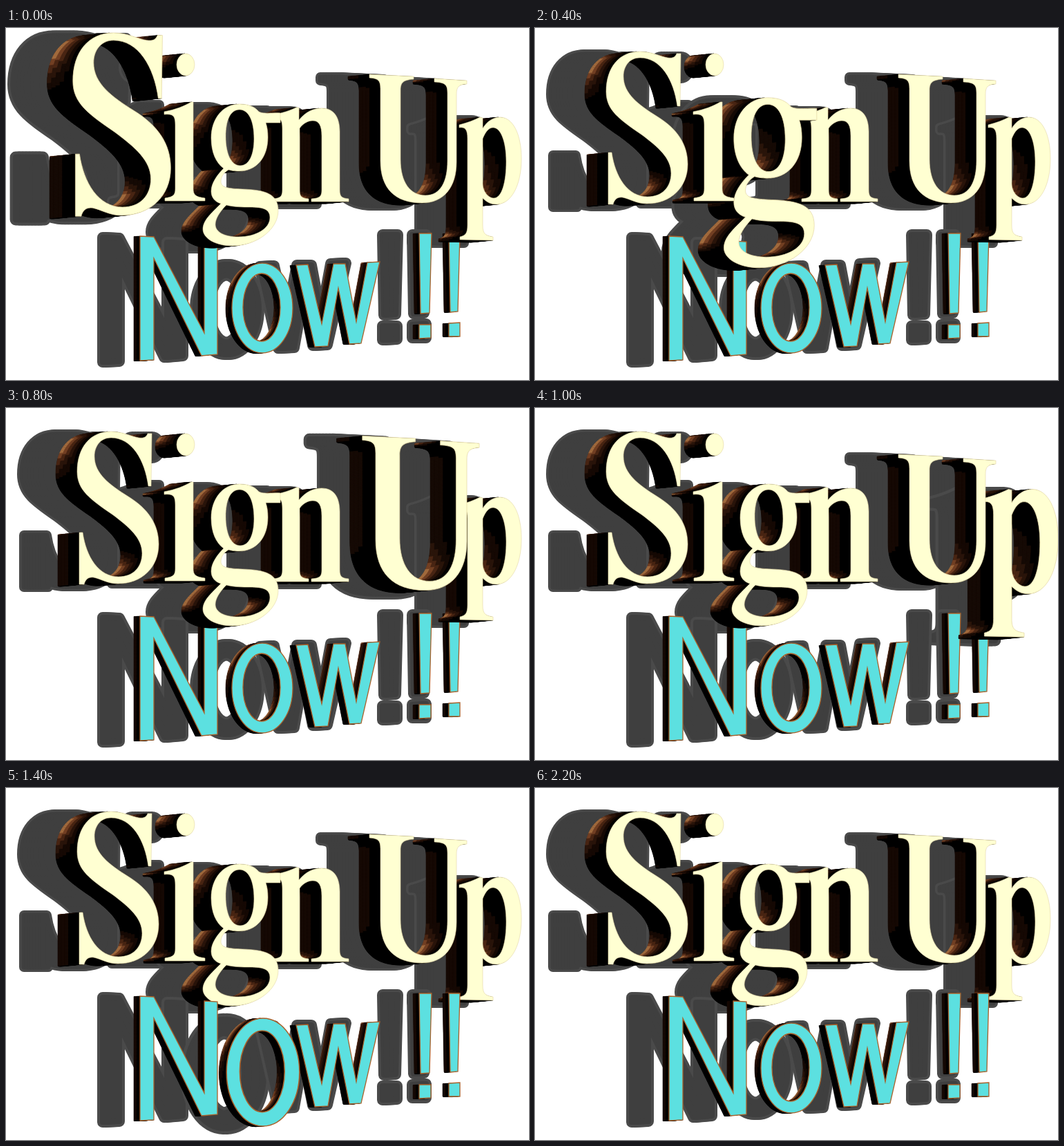
An HTML page with a canvas that plays this animation: 757 px wide and 509 px high, repeating every 2.4 s.

```html
<!DOCTYPE html>
<html lang="en">
<head>
<meta charset="utf-8">
<title>Sign Up Now!!</title>
<style>
html, body { margin: 0; width: 100%; height: 100%; overflow: hidden; background: #fff; }
canvas { display: block; }
</style>
</head>
<body>
<canvas id="stage" width="757" height="509" role="img" aria-label="Sign Up Now!!"></canvas>
<script>
const ctx = document.getElementById('stage').getContext('2d');
const STEP = 200, STEPS = 12, BANDS = 6;
const WALL = ['#000', '#160a05', '#2b150b', '#4a2614', '#744124', '#a36c3e'];

const ellipse = (x, y, rx, ry) =>
  `M${x - rx} ${y} A${rx} ${ry} 0 0 1 ${x + rx} ${y} A${rx} ${ry} 0 0 1 ${x - rx} ${y} Z`;

// Styles of the two words: face, edge, depth vector, shadow halo and its length
const serif = { face: '#ffffd2', edge: '#e3d5a4', line: 0.6, dx: -31, dy: 3, halo: 7, drop: 4, sweep: 28 };
const sans = { face: '#5ce0e0', edge: '#a9612b', line: 1.3, dx: -9, dy: 0.6, halo: 8, drop: 2, sweep: 4 };

// cx, cy: point each letter grows from; sx: shadow offset
const letters = [
  { style: serif, cx: 134, cy: 169, sx: -80, d: `M211 37 L210 113 L206 113 C201 75 182 43 152 43
    C138 43 128 54 128 70 C128 95 150 111 177 128 C206 146 221 168 221 197
    C221 231 196 254 162 254 C147 254 137 247 127 245 C119 244 115 248 113 255
    L106 255 L106 180 L111 180 C116 215 134 244 163 244 C184 244 197 230 197 210
    C197 188 178 172 154 154 C122 132 103 119 103 92 C103 57 122 34 152 34
    C169 34 180 41 192 43 C200 44 203 42 205 37 Z` },
  { style: serif, cx: 238, cy: 186, sx: -77, d: `M271 107 L271 232 C271 242 275 244 288 246 L288 250
    L230 250 L230 246 C242 244 245 242 245 232 L245 140 C245 126 241 124 229 125
    L229 121 C245 118 258 113 268 107 Z ` + ellipse(260, 53, 13, 16) },
  { style: serif, cx: 343, cy: 156, sx: -76, d: `M338 110 C352 110 360 114 366 121 C372 125 390 122 397 123
    L397 137 L376 137 C378 143 379 150 379 158 C379 188 362 207 337 207
    C330 207 326 206 322 205 C314 210 311 216 311 222 C311 231 322 232 342 233
    C376 234 394 240 394 264 C394 292 362 315 328 315 C303 315 285 304 285 291
    C285 278 297 268 311 254 C302 251 297 245 297 236 C297 224 306 212 315 203
    C304 195 297 180 297 159 C297 131 314 110 338 110 Z
    M338 118 C325 118 318 133 318 157 C318 182 326 199 339 199
    C352 199 359 183 359 160 C359 134 351 118 338 118 Z
    M319 256 C309 266 303 276 303 284 C303 295 316 302 336 302
    C362 302 382 290 382 274 C382 260 368 259 350 259 C336 259 326 258 319 256 Z` },
  { style: serif, cx: 426, cy: 179, sx: -74, d: `M424 115 L424 133 C434 121 445 116 457 116
    C474 116 483 128 483 150 L483 234 C483 244 486 246 496 247 L496 251 L442 251
    L442 247 C454 246 457 244 457 234 L457 156 C457 141 453 134 444 134
    C437 134 430 138 425 145 L425 234 C425 244 428 246 438 247 L438 251 L386 251
    L386 247 C397 246 400 244 400 234 L400 146 C400 132 397 129 385 130
    L385 126 C400 123 412 119 420 115 Z` },
  { style: serif, cx: 577, cy: 200, sx: -71, d: `M526 67 L590 70 L590 74 C575 75 571 79 571 90 L571 190
    C571 223 585 242 607 242 C629 242 639 222 639 192 L639 94 C639 82 636 79 620 78
    L620 73 L667 76 L667 81 C655 82 652 85 652 96 L652 194 C652 230 634 253 602 253
    C563 253 542 232 542 192 L542 88 C542 76 539 73 526 72 Z` },
  { style: serif, cx: 690, cy: 186, sx: -70, d: `M690 130 L690 145 C697 134 706 129 715 129
    C734 129 746 154 746 189 C746 228 731 255 710 255 C702 255 696 252 690 246
    L690 285 C690 298 694 300 705 302 L705 307 L657 306 L657 302
    C665 300 668 297 668 285 L668 160 C668 147 665 143 656 144 L656 140
    C668 137 678 133 686 129 Z
    M690 160 L690 225 C690 236 698 246 706 246 C718 246 724 222 724 193
    C724 164 716 144 705 144 C699 144 694 150 690 160 Z` },
  { style: sans, cx: 240, cy: 389, sx: -54, d: `M194 301 L214 302 L287 441 L287 308 L306 309 L306 472
    L283 474 L214 333 L214 480 L194 481 Z` },
  { style: sans, cx: 366, cy: 375, sx: -53, d: ellipse(371, 405, 44, 65) + ellipse(370, 404, 27, 49) },
  { style: sans, cx: 476, cy: 388, sx: -53, d: `M420 343 L437 342 L457 428 L474 341 L491 341 L507 425
    L523 339 L541 338 L514 456 L497 457 L481 376 L466 460 L447 461 Z` },
  { style: sans, cx: 608, cy: 370, sx: -53, d: `M598 297 L616 297 L613 412 L600 413 Z
    M598 429 L615 429 L615 448 L598 449 Z` },
  { style: sans, cx: 643, cy: 370, sx: -53, d: `M641 297 L657 297 L654 410 L643 411 Z
    M641 427 L657 426 L657 446 L641 446 Z` }
];

// Side walls that face the viewer, each with its brightness
function findWalls(letter) {
  const { dx, dy } = letter.style, walls = [];
  for (const part of letter.d.match(/M[^M]+/g)) {
    const el = document.createElementNS('http://www.w3.org/2000/svg', 'path');
    el.setAttribute('d', part);
    const len = el.getTotalLength(), n = Math.ceil(len / 2);
    const pts = Array.from({ length: n }, (_, i) => el.getPointAtLength(len * i / n));
    pts.forEach((a, i) => {
      const b = pts[(i + 1) % n], size = Math.hypot(b.x - a.x, b.y - a.y);
      if (size < 0.01) return;
      let nx = (b.y - a.y) / size, ny = (a.x - b.x) / size;
      const mx = (a.x + b.x) / 2, my = (a.y + b.y) / 2;
      if (ctx.isPointInPath(letter.path, mx + nx * 0.7, my + ny * 0.7, 'evenodd')) {
        nx = -nx;
        ny = -ny;
      }
      if (nx * dx + ny * dy <= 0) return;
      const light = Math.max(0, -0.75 * nx - 0.66 * ny) ** 4;
      walls.push({ a, b, light });
    });
  }
  return walls;
}

for (const l of letters) {
  l.path = new Path2D(l.d);
  l.walls = findWalls(l);
}

function grow(x, y, s) {
  ctx.translate(x, y);
  ctx.scale(s, s);
  ctx.translate(-x, -y);
}

function drawShadow(l, s) {
  const { halo, drop, sweep } = l.style;
  ctx.save();
  grow(l.cx + l.sx * 0.6, l.cy, s);
  ctx.lineJoin = 'round';
  for (const [color, width] of [['#4a4a4a', halo * 2], ['#3f3f3f', halo]]) {
    ctx.fillStyle = ctx.strokeStyle = color;
    ctx.lineWidth = width;
    for (let x = 0; x <= sweep; x += 4) {
      ctx.save();
      ctx.translate(l.sx + x, drop);
      ctx.fill(l.path, 'evenodd');
      ctx.stroke(l.path);
      ctx.restore();
    }
  }
  ctx.restore();
}

function drawSides(l) {
  const { dx, dy } = l.style, layers = Math.ceil(-dx);
  ctx.fillStyle = '#000';
  for (let i = layers; i > 0; i--) {
    const t = i / layers;
    ctx.save();
    ctx.translate(dx * t, dy * t);
    ctx.fill(l.path, 'evenodd');
    ctx.restore();
  }
  ctx.lineWidth = 0.6;
  for (let k = BANDS; k > 0; k--) {
    const t0 = (k - 1) / BANDS, t1 = k / BANDS;
    for (const { a, b, light } of l.walls) {
      const tone = Math.min(5, Math.floor(light * t1 * 6));
      ctx.fillStyle = ctx.strokeStyle = WALL[tone];
      ctx.beginPath();
      ctx.moveTo(a.x + dx * t0, a.y + dy * t0);
      ctx.lineTo(b.x + dx * t0, b.y + dy * t0);
      ctx.lineTo(b.x + dx * t1, b.y + dy * t1);
      ctx.lineTo(a.x + dx * t1, a.y + dy * t1);
      ctx.closePath();
      ctx.fill();
      ctx.stroke();
    }
  }
}

function drawLetter(l, s) {
  ctx.save();
  grow(l.cx, l.cy, s);
  drawSides(l);
  ctx.fillStyle = l.style.face;
  ctx.fill(l.path, 'evenodd');
  ctx.lineJoin = 'miter';
  ctx.lineWidth = l.style.line;
  ctx.strokeStyle = l.style.edge;
  ctx.stroke(l.path);
  ctx.restore();
}

// Left letters overlap right ones
const upper = letters.slice(0, 6).reverse();
const lower = letters.slice(6).reverse();

function draw(step) {
  const active = letters[step];
  const size = l => l === active ? 1.2 : 1;
  ctx.fillStyle = '#fff';
  ctx.fillRect(0, 0, 757, 509);
  for (const l of letters) drawShadow(l, size(l));
  // The word with the grown letter stands in front
  const words = upper.includes(active) ? [lower, upper] : [upper, lower];
  for (const l of words.flat()) drawLetter(l, size(l));
}

let shown = -1;
const start = performance.now();
function tick(now) {
  const step = Math.floor(Math.max(0, now - start) / STEP) % STEPS;
  if (step !== shown) draw(shown = step);
  requestAnimationFrame(tick);
}
tick(start);
</script>
</body>
</html>
```
